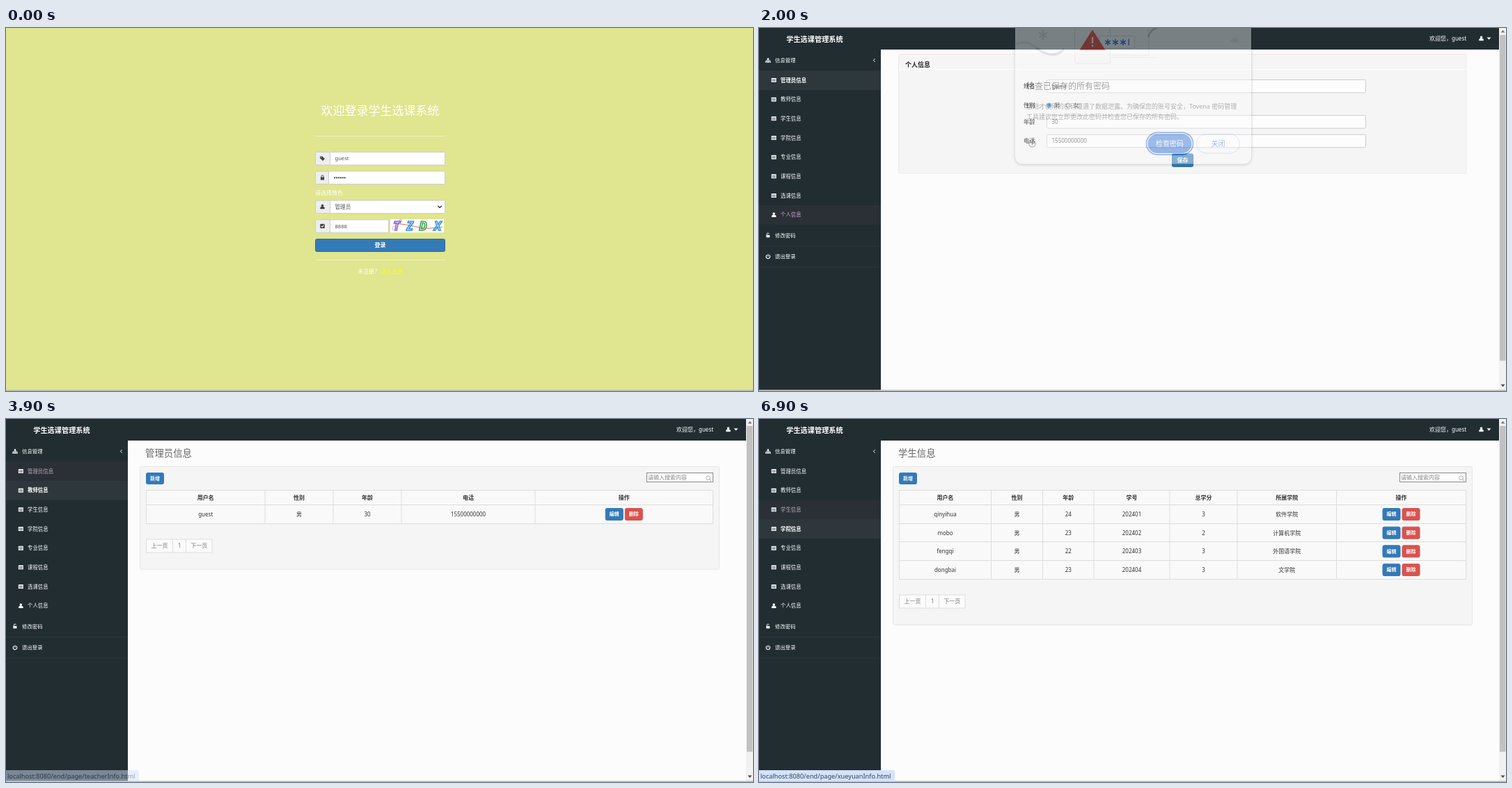
An HTML page for the animation above (8 s loop, 1073 px wide and 522 px high).

```html
<!DOCTYPE html>
<html lang="zh-CN">
<head>
<meta charset="utf-8">
<title>学生选课管理系统</title>
<style>
  html, body { margin: 0; width: 100%; height: 100%; overflow: hidden; }
  svg { display: block; width: 1073px; height: 522px; }
  text { font-family: "Noto Sans", "Noto Sans CJK SC", sans-serif; white-space: pre; }
</style>
</head>
<body>
<svg id="stage" viewBox="0 0 1073 522"></svg>
<script>
const LOOP = 8000;
const BLUE = '#337ab7', RED = '#d9534f', DARK = '#222d32';
const USER = 'guest', PHONE = '15500000000';

// Drawing helpers; text is placed by its vertical centre.
const rect = (x, y, w, h, fill, extra = '') =>
  `<rect x="${x}" y="${y}" width="${w}" height="${h}" fill="${fill}" ${extra}/>`;
const box = (x, y, w, h, fill, line, r = 0) =>
  rect(x + .5, y + .5, w - 1, h - 1, fill, `stroke="${line}" rx="${r}"`);
const path = (d, fill, line = 'none', w = 1) =>
  `<path d="${d}" fill="${fill}" stroke="${line}" stroke-width="${w}"/>`;
const circle = (x, y, r, fill, line = 'none', w = 1) =>
  `<circle cx="${x}" cy="${y}" r="${r}" fill="${fill}" stroke="${line}" stroke-width="${w}"/>`;
const text = (x, y, size, str, fill = '#333', weight = 400, anchor = 'start') =>
  `<text x="${x}" y="${y + size * .36}" font-size="${size}" fill="${fill}" font-weight="${weight}" text-anchor="${anchor}">${str}</text>`;
const mid = (x, y, size, str, fill, weight) => text(x, y, size, str, fill, weight, 'middle');
const group = (x, y, body, opacity = 1) =>
  `<g transform="translate(${x} ${y})" opacity="${opacity}">${body}</g>`;
const button = (x, y, w, h, label, fill, size = 7, line = fill) =>
  box(x, y, w, h, fill, line, 2) + mid(x + w / 2, y + h / 2 - .3, size, label, '#fff', 700);

// Icons are centred on 0,0.
const icons = {
  user: c => circle(0, -1.6, 1.8, c) + path('M-3.2 3.2V1.5Q-3 0 -1.5 0H1.5Q3 0 3.2 1.5V3.2Z', c),
  tag: c => path('M-3.5-3H-.2L3.5.6.5 3.5-3.5-.2Z', c) + circle(-2.1, -1.7, .6, '#eee'),
  lock: c => rect(-2.6, -.5, 5.2, 4, c, 'rx=".5"') + path('M-1.6 0V-1.6A1.6 1.6 0 0 1 1.6-1.6V0', 'none', c),
  unlock: c => rect(-2.6, -.3, 5, 3.5, c) + path('M-1.6 0V-1.6A1.4 1.4 0 0 1 1.2-1.8', 'none', c),
  check: c => rect(-3.3, -3.1, 6.6, 6.4, c, 'rx="1"') + path('M-1.9 0L-.4 1.4 2.1-1.3', 'none', '#eee', 1.1),
  grid: c => rect(-3.5, -3, 7, 6, c, 'rx=".5"') +
    path('M-3-.9H3M-3 1H3M-1.1-1.6V2.5M1.1-1.6V2.5', 'none', DARK, .5),
  tree: c => rect(-1.2, -3.2, 2.4, 2.4, c) + [-3.7, -1.1, 1.5].map(x => rect(x, 1, 2.2, 2.2, c)).join('') +
    path('M0-1V1M-2.6 1V0H2.6V1', 'none', c, .7),
  power: c => path('M-1.6-2.2A2.8 2.8 0 1 0 1.6-2.2M0-3.4V0', 'none', c, 1.1),
};
const icon = (name, x, y, c = '#fff') => group(x, y, icons[name](c));

function login(s) {
  const field = (name, y, split, right, str) =>
    box(444, y, split - 443, 19.5, '#eee', '#ccc', 2) + box(split, y, right - split, 19.5, '#fff', '#ccc', 1) +
    icon(name, 454.5, y + 9.5, '#444') + text(split + 7.5, y + 9.7, 7.6, str, '#555');
  const rule = y => rect(444, y, 187, 1, '#eef0c6');
  const captcha = rect(552, 275, 77, 19, '#fff') +
    [['T', 561, '#8a63e0'], ['Z', 580, '#2f8fe8'], ['D', 599, '#3aa650'], ['X', 620, '#2a9be0']]
      .map(([ch, x, c]) => `<text x="${x}" y="291" font-size="17" font-weight="700" font-style="italic" text-anchor="middle" fill="#fff" stroke="${c}" stroke-width="1.6">${ch}</text>`).join('') +
    path('M556 281Q575 282 590 286T627 286', 'none', '#e05a5a', .9) +
    circle(566.5, 277, 1.5, 'none', '#777', .6) + circle(558, 288, 3, 'none', '#d78ad8', .7);
  return rect(0, 0, 1073, 522, '#e0e58f') +
    mid(537.5, 119, 17, '欢迎登录学生选课系统', '#fff') + rule(155) +
    field('tag', 178, 465, 631, USER) +
    field('lock', 205.5, 463, 631, '') +
    [0, 1, 2, 3, 4, 5].map(i => circle(472.2 + i * 2.9, 215.3, 1.1, '#333')).join('') +
    text(444, 237, 8, '请选择角色', '#fff') +
    field('user', 247.5, 465, 631, '管理员') + path('M620.3 255.7L623 258.4 625.7 255.7', 'none', '#222', 1.3) +
    field('check', 275.3, 465, 550, '8888') + captcha +
    button(444, 303, 187, 19, '登录', s.btn, 8, s.btn == BLUE ? '#2e6da4' : '#204d74') + rule(333) +
    text(505, 350, 8, '未注册？', '#fff') + text(538, 350, 8, '请先注册', '#ff0');
}

function form() {
  const input = (y, label, str) =>
    text(380, y, 8.2, label, '#333', 700) + box(413, y - 9.5, 459, 19.5, '#fdfdfd', '#ccc', 2) +
    text(420.5, y + .3, 8, str, '#555');
  return box(200, 37, 816.5, 172.5, '#f5f5f5', '#ebebeb', 2) +
    text(210, 52.5, 9, '个人信息', '#222', 700) + rect(201, 59, 815, 1, '#fff') +
    input(83.5, '姓名', USER) +
    text(380, 111, 8.2, '性别', '#333', 700) +
    circle(417, 111.2, 3.2, '#fff', '#0075ff', 1) + circle(417, 111.2, 1.9, '#0075ff') + text(424, 111, 8.3, '男') +
    circle(444, 111.2, 3.2, '#fff', '#767676', .8) + text(451.5, 111, 8.3, '女') +
    input(134.7, '年龄', '30') + input(162.3, '电话', PHONE) +
    button(593, 180.5, 31, 19.5, '保存', BLUE, 8, '#2e6da4');
}

const tables = {
  manager: {
    title: '管理员信息', cols: [201.5, 372, 470, 568, 760, 1015.5],
    head: '用户名 性别 年龄 电话 操作', rows: [`${USER} 男 30 ${PHONE}`],
  },
  teacher: {
    title: '教师信息', cols: [201.5, 372, 455, 537.5, 646, 806.5, 1015.5],
    head: '用户名 性别 年龄 职称 专业 操作',
    rows: ['songyuetu 男 35 教授 软件工程', 'tangheyuan 男 29 教授 汉语言信息', 'qiaomuchen 女 28 副教授 软件工程'],
  },
  student: {
    title: '学生信息', cols: [201.5, 333.5, 407.5, 481, 590, 687, 829.5, 1015.5],
    head: '用户名 性别 年龄 学号 总学分 所属学院 操作',
    rows: ['qinyihua 男 24 202401 3 软件学院', 'mobo 男 23 202402 2 计算机学院',
      'fengqi 男 22 202403 3 外国语学院', 'dongbai 男 23 202404 3 文学院'],
  },
};

function table({ title, cols, head, rows }) {
  const top = 102.5, first = 124, step = 26.65;
  const bottom = Math.round(first + rows.length * step) - .5;
  const line = d => path(d, 'none', '#ddd');
  const centre = i => (cols[i] + cols[i + 1]) / 2;
  const cells = (str, y, fill, weight) =>
    str.split(' ').map((c, i) => mid(centre(i), y, 8, c, fill, weight)).join('');
  const last = centre(cols.length - 2);
  const pager = bottom + 22;
  let out = text(200, 49.5, 13.4, title, '#666') +
    box(192, 68, 833, bottom + 66 - 68, '#f5f5f5', '#e6e6e6', 2) +
    button(201, 77, 26, 17, '新增', BLUE) +
    box(920, 77, 96, 14, '#fdfdfd', '#888') + text(922, 84, 8, '请输入搜索内容', '#888') +
    circle(1008.5, 84.7, 2.9, 'none', '#999', .8) + path('M1010.6 86.8L1013 89.2', 'none', '#999', .9) +
    rect(201.5, top, 814, bottom - top, '#f9f9f9') +
    cols.map(x => line(`M${x} ${top}V${bottom}`)).join('') +
    line(`M201 ${top}H1016M201 123.5H1016`) + cells(head, 113, '#333', 700);
  rows.forEach((row, i) => {
    const y = first + i * step;
    out += line(`M201 ${Math.round(y + step) - .5}H1016`) + cells(row, y + 13, '#333') +
      button(last - 27, y + 4, 26, 18, '编辑', BLUE) + button(last + 1, y + 4, 26, 18, '删除', RED);
  });
  for (const [x, w, str] of [[201, 39, '上一页'], [239, 20, '1'], [258, 38.5, '下一页']])
    out += box(x, pager, w, 20, '#fbfbfb', '#ddd') + mid(x + w / 2, pager + 10, 8, str, '#777');
  return out;
}

function dialog() {
  const art =
    path('M369 23Q382 17 394 25T418 39Q430 41 438 31', 'none', '#e4e5e7', 3) +
    path('M398 29Q420 46 438 31', 'none', '#bdc1c6', 3) +
    path('M408 3V17M402 6.5L414 13.5M414 6.5L402 13.5', 'none', '#dadce0', 1.8) +
    box(453, -8, 52, 59.5, '#f8f9fa', '#dadce0', 4) + path('M505 42.5H570M505 39.5H560V0', 'none', '#dadce0', .8) +
    path('M559 13Q562 2 573-1', 'none', '#bdc1c6', 2.5) + path('M676.5 21A6.5 6.5 0 0 1 689.5 21Z', '#e8eaed') +
    box(489, 11, 51, 18.5, '#fff', '#dadce0', 2) +
    [501, 512, 523].map(x => path(`M${x} 16V25M${x - 3.8} 18.2L${x + 3.8} 22.8M${x + 3.8} 18.2L${x - 3.8} 22.8`, 'none', '#1a73e8', 1.6)).join('') +
    rect(530.5, 15.5, 1.4, 9.5, '#1a73e8') +
    path('M479 4L496.5 31.5H461.5Z', '#ea4335', '#ea4335', 1.5) +
    rect(477.8, 13, 2.4, 9, '#fff') + rect(477.8, 24.3, 2.4, 2.5, '#fff');
  const pill = (x, y, w, h, fill, line, lw = 1) =>
    rect(x, y, w, h, fill, `rx="${h / 2}" stroke="${line}" stroke-width="${lw}"`);
  return rect(368, -20, 339, 215.5, '#fcfcfc', 'rx="10" style="filter:drop-shadow(0 1px 2px #0007)"') + art +
    text(384, 83.5, 12, '检查已保存的所有密码', '#1f1f1f') +
    text(384, 112.3, 9, '您刚才使用的密码遭遇了数据泄露。为确保您的账号安全，Tovena 密码管理', '#474747') +
    text(384, 127.5, 9, '工具建议您立即更改此密码并检查您已保存的所有密码。', '#474747') +
    circle(392.5, 166.2, 4.8, 'none', '#444', 1.1) + rect(392, 165.4, 1.1, 3.4, '#444') + rect(392, 163.2, 1.1, 1.2, '#444') +
    pill(556.5, 150.3, 67, 31.8, '#fff', '#0b57d0', 1.7) + pill(558.5, 152.5, 63, 27.5, '#0b57d0', 'none') +
    mid(590, 166.3, 10, '检查密码', '#fff') +
    pill(628.5, 152.5, 62, 27.5, '#fcfcfc', '#a8c7fa') + mid(659.5, 166.3, 10, '关闭', '#0b57d0');
}

const menu = ['管理员信息', '教师信息', '学生信息', '学院信息', '专业信息', '课程信息', '选课信息', '个人信息'];

function shell(s) {
  const rows = menu.map((label, i) => {
    const y = 75 + i * 27.67, active = i == s.active;
    const back = active ? '#2b3037' : i == s.lit ? '#2e383c' : '';
    const ink = !active ? '#fff' : s.page == 'form' ? '#d3a5d8' : '#b9afc0';
    return (back && rect(0, y - 13.7, 175, 27.7, back)) +
      icon(i == 7 ? 'user' : 'grid', 21.3, y) +
      text(31, y, 7.45, label, ink, i == s.hover ? 700 : 500);
  }).join('');
  return rect(0, 0, 1073, 522, '#fcfcfc') + rect(0, 0, 1063, 31, DARK) + rect(0, 31, 175, 490, DARK) +
    mid(80, 16.3, 10.2, '学生选课管理系统', '#fff', 700) +
    text(963, 14.8, 8, '欢迎您，' + USER, '#fff') + icon('user', 1037.5, 15) + path('M1045.5 13.5H1051.5L1048.5 16.8Z', '#fff') +
    icon('tree', 13, 46.5) + text(23, 46.3, 7.4, '信息管理', '#fff', 500) +
    path('M166.6 44.2L164.4 46.4 166.6 48.6', 'none', '#fff') + rows +
    icon('unlock', 13, 298) + text(23, 298.3, 7.4, '修改密码', '#fff', 500) +
    icon('power', 13, 328.7) + text(23, 328.7, 7.4, '退出登录', '#fff', 500) +
    rect(0, 313, 175, 1, '#2d393e') + rect(0, 343.5, 175, 1, '#2d393e') +
    rect(1063, 0, 10, 521, '#f1f1f1') + rect(1064, 10, 8.5, 468.5, '#c1c1c1') +
    path('M1065.5 6.5H1071.5L1068.5 3Z', '#777') + path('M1065.5 512.5H1071.5L1068.5 516Z', '#444');
}

const linkWidth = { guest: 186, teacher: 191, student: 192, xueyuan: 195 };
const status = (name, opacity) => group(0, 505,
  path(`M0 0H${linkWidth[name] - 3}Q${linkWidth[name]} 0 ${linkWidth[name]} 3V16H0Z`, '#d3e3fd') +
  text(2, 8.9, 9.2, `localhost:8080/end/page/${name}Info.html`, '#3c4043'), opacity);

// Each step changes part of the state from the given time on.
const steps = [
  [0, { page: 'login', btn: BLUE, dialog: 0, bar: 0 }],
  [600, { btn: '#3074af' }], [700, { btn: '#2d6ca3' }], [800, { btn: '#2b6699' }], [900, { btn: '#2a608f' }],
  [1000, { page: 'form', active: 7 }],
  [1400, { hover: 2 }], [1500, { hover: 1 }], [1700, { hover: 0 }],
  [2000, { lit: 0, dialog: .4 }], [2100, { dialog: .8, link: 'guest', bar: .5 }], [2200, { dialog: 1, bar: 1 }],
  [2700, { bar: .75 }], [2800, { bar: .35 }], [2900, { bar: 0, dialog: .5 }], [3000, { dialog: 0 }],
  [3200, { hover: 1 }], [3300, { hover: 0 }],
  [3700, { page: 'manager', active: 0, hover: -1, lit: -1 }], [3800, { hover: 1, lit: 1 }],
  [3900, { link: 'teacher', bar: .5 }], [4000, { bar: 1 }],
  [4900, { page: 'teacher', active: 1, hover: -1, lit: -1 }],
  [5100, { bar: .5 }], [5200, { bar: 0 }], [5700, { hover: 2 }],
  [5900, { link: 'student', bar: .5 }], [6000, { bar: 1 }],
  [6800, { page: 'student', active: 2, hover: -1 }], [6900, { hover: 3, lit: 3, link: 'xueyuan' }],
];

function draw(s) {
  const scene = s.page == 'login' ? login(s) : shell(s) + (s.page == 'form' ? form() : table(tables[s.page]));
  return scene + rect(0, 520.3, 1073, 1.7, '#bfc0bc') +
    (s.dialog ? group(0, 0, dialog(), s.dialog) : '') + (s.bar ? status(s.link, s.bar) : '');
}

const stage = document.getElementById('stage');
let shown = 0;
function frame() {
  const t = performance.now() % LOOP;
  const past = steps.filter(([at]) => at <= t);
  if (past.length != shown) {
    shown = past.length;
    stage.innerHTML = draw(Object.assign({}, ...past.map(([, change]) => change)));
  }
  requestAnimationFrame(frame);
}
frame();
</script>
</body>
</html>
```
